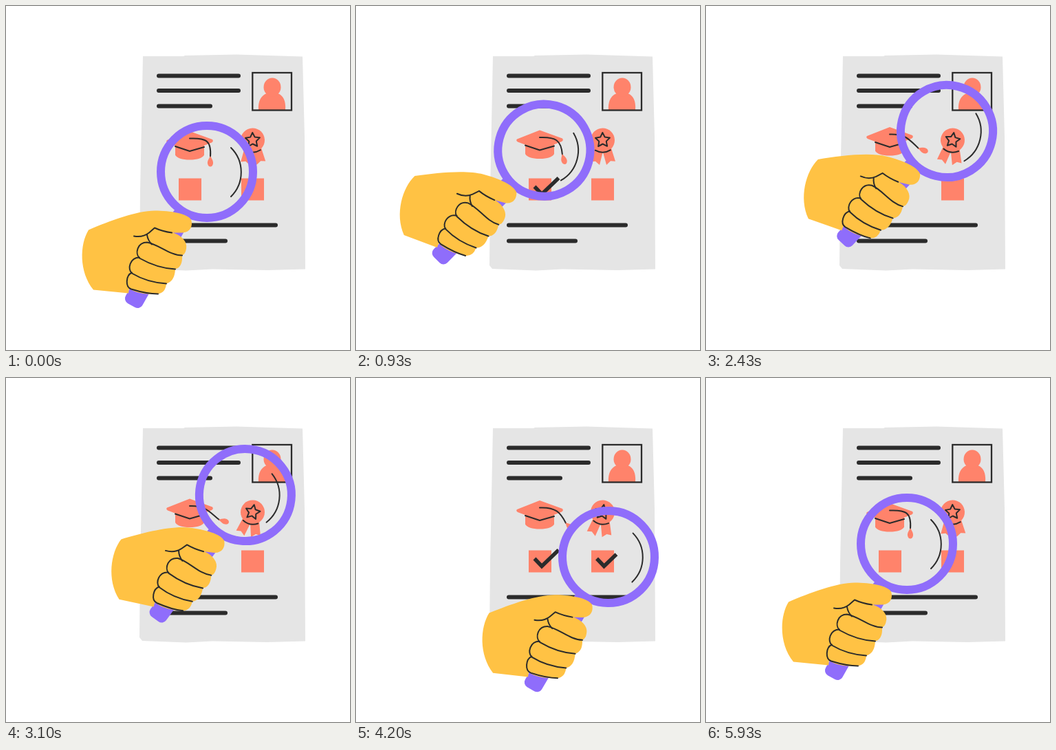
These frames come from a looping animation (500x500 px, 6.01 s). An HTML page:

```html
<!DOCTYPE html>
<html lang="en">
<head>
<meta charset="utf-8">
<title>Checking a résumé</title>
<style>
  html, body { margin: 0; width: 100%; height: 100%; overflow: hidden; background: #fff; }
  svg { display: block; width: 100vw; height: 100vh; }
  .coral { fill: #ff836b; }
  .yellow { fill: #ffc244; }
  .ink { fill: none; stroke: #2b2b2b; stroke-width: 2; stroke-linecap: round; stroke-linejoin: round; }
  .text { stroke-width: 6; }
  .check { stroke-width: 5.5; stroke-linecap: butt; stroke-linejoin: miter; }
</style>
</head>
<body>
<svg viewBox="0 0 500 500">
  <path fill="#e5e5e5" d="M199 73L258 73L260 72L335 70.5L431 73.5L434 190L435 382.5L380 384L300 382.5L262 384.5L198 382L194 377L195 270Z"/>
  <path class="ink text" d="M222 101.5H338M222 123H338M222 145.5H297M222 318.5H392M222 341.5H319"/>

  <path class="coral" d="M367 151C366 138 371 130 379 127H395C403 130 407 138 406 151Z"/>
  <ellipse class="coral" cx="387" cy="118" rx="12.5" ry="13.5"/>
  <rect class="ink" x="358.3" y="97" width="56.7" height="54.5" style="stroke-width:2.3;stroke-linejoin:miter"/>

  <path class="coral" d="M251 250.5h33v32h-33zM342 250.5h33v32h-33z"/>
  <path id="check1" class="ink check" pathLength="1" d="M259.5 262.5L270 273.5L294.5 250"/>
  <path id="check2" class="ink check" pathLength="1" d="M350 262.5L360.5 273.5L385 250"/>

  <g id="cap">
    <path class="coral" d="M246 200V215Q250 222 267 222T288 215V200Z"/>
    <path class="coral" d="M234 193.5L267 180.5L300 192.5Q302 195 299 197L267 209.5L235 197.5Q232 195.5 234 193.5Z"/>
    <path class="ink" d="M246 202.5L267 209.5L288 203.5"/>
  </g>
  <path id="rope" class="ink"/>
  <path id="drop" class="coral" d="M-1 0C3 -2 6 -4.5 10 -4C16 -3 16 3 10 4C6 4.5 3 2 -1 0Z"/>

  <g id="medal">
    <path class="coral" d="M-12 11L-18 31L-11 30.5L-5 36L0 17L5 36L11 30.5L18 31L12 11Z"/>
    <circle class="coral" r="17.5"/>
    <path id="star" class="ink"/>
    <path class="ink" d="M-11 14.5Q0 21 11 14.5"/>
  </g>

  <g id="magnifier">
    <rect fill="#8f6dfb" x="66" y="-14" width="157" height="28" rx="8" transform="translate(292 241) rotate(119.5)"/>
    <circle cx="292" cy="241" r="67" fill="none" stroke="#8f6dfb" stroke-width="12"/>
    <path class="ink" d="M327 206A50 50 0 0 1 327 277"/>
    <g transform="translate(0 1.5)">
      <path class="yellow" d="M120 324C150 311 190 296 216 296C240 296 263 300 269 309C272 318 268 327 257 328L242 328C256 332 264 342 262 351Q261 359 256 361Q257 378 246 381Q245 399 233 402Q232 415 221 417C205 418 188 416 179 409L178 416L127 411C106 385 107 345 120 324Z"/>
      <path class="ink" d="M186 333C197 335 203 332 208 328L216 321Q227 326 241 328M205 331Q206 339 212 345"/>
      <path class="ink" d="M256 361C238 361 222 345 205 342C191 342 187 358 194 365C208 373 226 380 246 381M194 364C180 364 176 381 183 387C198 396 216 401 233 402M183 386C174 390 173 407 182 410C195 414 207 417 221 417"/>
    </g>
  </g>
</svg>
<script>
const LOOP = 6010, CYCLE = 5900;
const el = id => document.getElementById(id);
const clamp = v => Math.min(1, Math.max(0, v));
const ease = u => (1 - Math.cos(Math.PI * clamp(u))) / 2;

// Rests at each [time, value] stop, easing from one to the next
const follow = (stops, t) => stops.slice(1).reduce((value, [end, to], i) => {
  const [start, from] = stops[i];
  return value + (to - from) * ease((t - start) / (end - start));
}, stops[0][1]);

const lens = {
  x: [[0, 292], [1250, 270], [1520, 270], [2650, 358], [3200, 347], [4200, 367], [4400, 367], [5800, 292]],
  y: [[0, 241], [1250, 204], [1650, 204], [3000, 168.5], [4200, 260], [4400, 260], [5800, 241]],
  tilt: [[0, 0], [1250, 17.6], [1700, 17.6], [4000, 1], [5800, 0]]
};

// One slow swing out and back per cycle
const swing = t => (1 - Math.cos(2 * Math.PI * t / CYCLE)) / 2;

function drawCheck(id, t, start) {
  const p = clamp((t - start) / 490);
  el(id).style.display = p > 0 && t < CYCLE ? '' : 'none';
  el(id).setAttribute('stroke-dasharray', `${p} 2`);
}

function place(id, x, y, angle = 0) {
  el(id).setAttribute('transform', `translate(${x} ${y}) rotate(${angle})`);
}

function render(t) {
  const x = follow(lens.x, t), y = follow(lens.y, t), tilt = follow(lens.tilt, t);
  el('magnifier').setAttribute('transform', `translate(${x} ${y}) rotate(${tilt}) translate(-292 -241)`);

  const s = swing(Math.min(t, CYCLE));
  const lift = 1.5 - 6.5 * s, endX = 297 + 13 * s, endY = 219 - 13 * s;
  place('cap', 0, lift);
  el('rope').setAttribute('d', `M267 ${191 + lift}C290 ${190 + lift} ${299 - 3 * s} 195 ${endX} ${endY}`);
  place('drop', endX, endY, 90 - 75 * s);
  place('medal', 358.5, 195, 14 * swing(t - 400) - 2);

  drawCheck('check1', t, 300);
  drawCheck('check2', t, 3800);
}

const starPoints = Array.from({ length: 10 }, (_, i) => {
  const r = i % 2 ? 5.5 : 11, a = i * Math.PI / 5 - Math.PI / 2;
  return `${r * Math.cos(a)} ${r * Math.sin(a)}`;
});
el('star').setAttribute('d', `M${starPoints.join('L')}Z`);

// The picture steps at 0 and 30 ms of every tenth of a second
function snap(t) {
  const base = Math.floor(t / 100) * 100;
  return Math.min(5930, t - base >= 30 ? base + 30 : base);
}

const begin = performance.now();
function tick() {
  render(snap((performance.now() - begin) % LOOP));
  requestAnimationFrame(tick);
}
tick();
</script>
</body>
</html>
```
